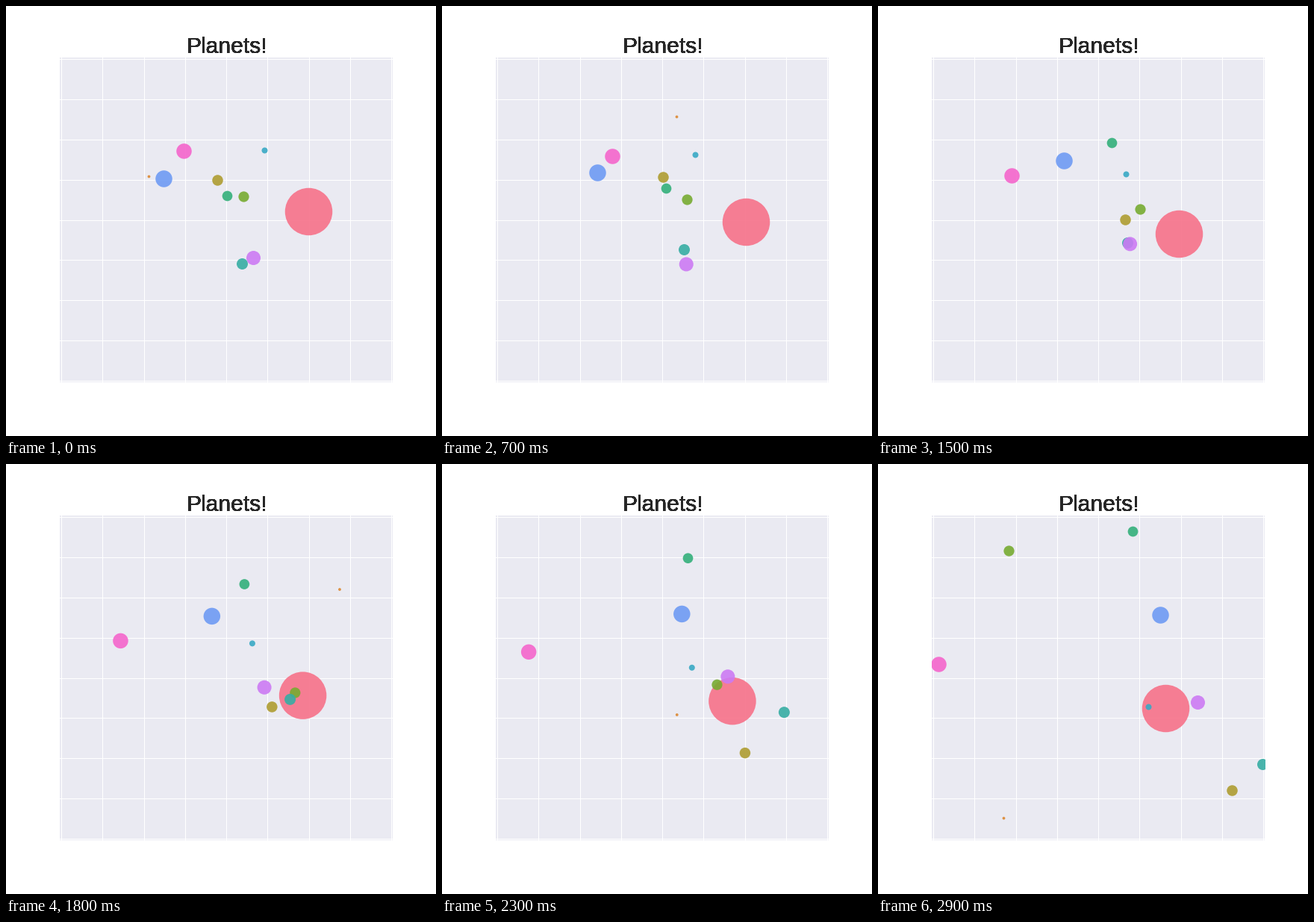
These frames come from a looping animation (576x576 px, 3000 ms). A matplotlib script:

```python
import matplotlib.pyplot as plt
import numpy as np
from matplotlib.animation import FuncAnimation
from matplotlib.transforms import Bbox

SIZE, DPI = 576, 72
FRAMES, INTERVAL = 30, 100
LEFT, RIGHT, TOP, BOTTOM = 72, 518.4, 69.12, 504
MID_X, MID_Y = (LEFT + RIGHT) / 2, (TOP + BOTTOM) / 2

T = np.arange(FRAMES)
EVEN = [0, 7, 15, 21, 29]
BUMP = [0, 7, 11, 15, 29]      # two planets that collide early on
SWING = [0, 11, 21, 25, 29]    # late turn around the big planet


def smooth(keys, values):
    """Cubic Hermite curve over T; through three points it is a parabola."""
    keys, values = np.array(keys, float), np.array(values, float)
    slopes = np.gradient(values, keys, edge_order=2)
    i = np.clip(np.searchsorted(keys, T, side="right") - 1, 0, len(keys) - 2)
    h = keys[i + 1] - keys[i]
    u = (T - keys[i]) / h
    return ((1 + 2 * u) * (1 - u) ** 2 * values[i]
            + u * (1 - u) ** 2 * h * slopes[i]
            + u * u * (3 - 2 * u) * values[i + 1]
            + u * u * (u - 1) * h * slopes[i + 1])


def curve(xs, ys, keys=EVEN):
    return np.column_stack([smooth(keys, xs), smooth(keys, ys)]) + 0.5


# The smallest planet speeds out of the top and later falls back in.
leaving = curve([191, 314, 422], [228, 148, 67], [0, 7, 11])
falling = curve([502, 366, 168], [87, 274, 474], [16, 21, 29])
comet = np.where(T[:, None] < 13, leaving, falling)

planets = [  # colour, diameter, path
    ("#f77189", 63.5, curve([405, 407, 403, 391, 385],
                            [275, 289, 305, 314, 327])),
    ("#dc8932", 3.8, comet),
    ("#ae9d31", 14.5, curve([283, 296, 331, 385, 474],
                            [233, 229, 286, 365, 437])),
    ("#77ab31", 14.2, curve([318, 328, 351, 400, 317, 175],
                            [255, 259, 272, 321, 251, 116],
                            [0, 7, 15, 21, 25, 29])),
    ("#33b07a", 13.7, curve([296, 300, 313, 325, 341],
                            [254, 244, 183, 139, 90])),
    ("#36ada4", 15, curve([316, 324, 334, 432, 515],
                          [345, 326, 317, 320, 402])),
    ("#38a9c5", 8, curve([346, 339, 332, 330, 362],
                         [193, 199, 225, 258, 325])),
    ("#6e9bf4", 22.5, curve([211, 208, 215, 249, 378],
                            [231, 223, 214, 207, 202], BUMP)),
    ("#cc7af4", 19, curve([331, 331, 363, 402, 428],
                          [337, 339, 287, 287, 319], SWING)),
    ("#f565cc", 20.5, curve([238, 228, 218, 179, 81],
                            [194, 201, 214, 227, 268], BUMP)),
]
colors, diameters, paths = zip(*planets)
paths = np.array(paths)

fig = plt.figure(figsize=(SIZE / DPI, SIZE / DPI), dpi=DPI, facecolor="white")
ax = fig.add_axes([LEFT / SIZE, 1 - BOTTOM / SIZE,
                   (RIGHT - LEFT) / SIZE, (BOTTOM - TOP) / SIZE],
                  facecolor="#eaeaf2")
ax.set(xlim=(LEFT, RIGHT), ylim=(BOTTOM, TOP))
steps = np.arange(-4, 5)
ax.set_xticks(MID_X + 55.28 * steps)
ax.set_yticks(MID_Y + 53.86 * steps)
ax.tick_params(length=0, labelbottom=False, labelleft=False)
ax.grid(color="white", linewidth=1)
ax.set_axisbelow(True)
ax.spines[:].set_visible(False)

# Stacked copies of the title harden and thicken the letter edges.
for _ in range(10):
    ax.text(MID_X + 1, TOP - 6, "Planets!", fontsize=30, color="0.15",
            family="Liberation Sans", ha="center", va="baseline")

dots = ax.scatter(*paths[:, 0].T, s=np.square(diameters),
                  c=colors, alpha=0.9, linewidths=0)
dots.set_clip_box(Bbox.from_extents(LEFT, SIZE - BOTTOM, RIGHT + 0.6, SIZE - TOP))
dots.set_clip_path(None)


def update(frame):
    dots.set_offsets(paths[:, frame])
    return [dots]


anim = FuncAnimation(fig, update, frames=FRAMES, interval=INTERVAL, repeat=True)
plt.show()
```
